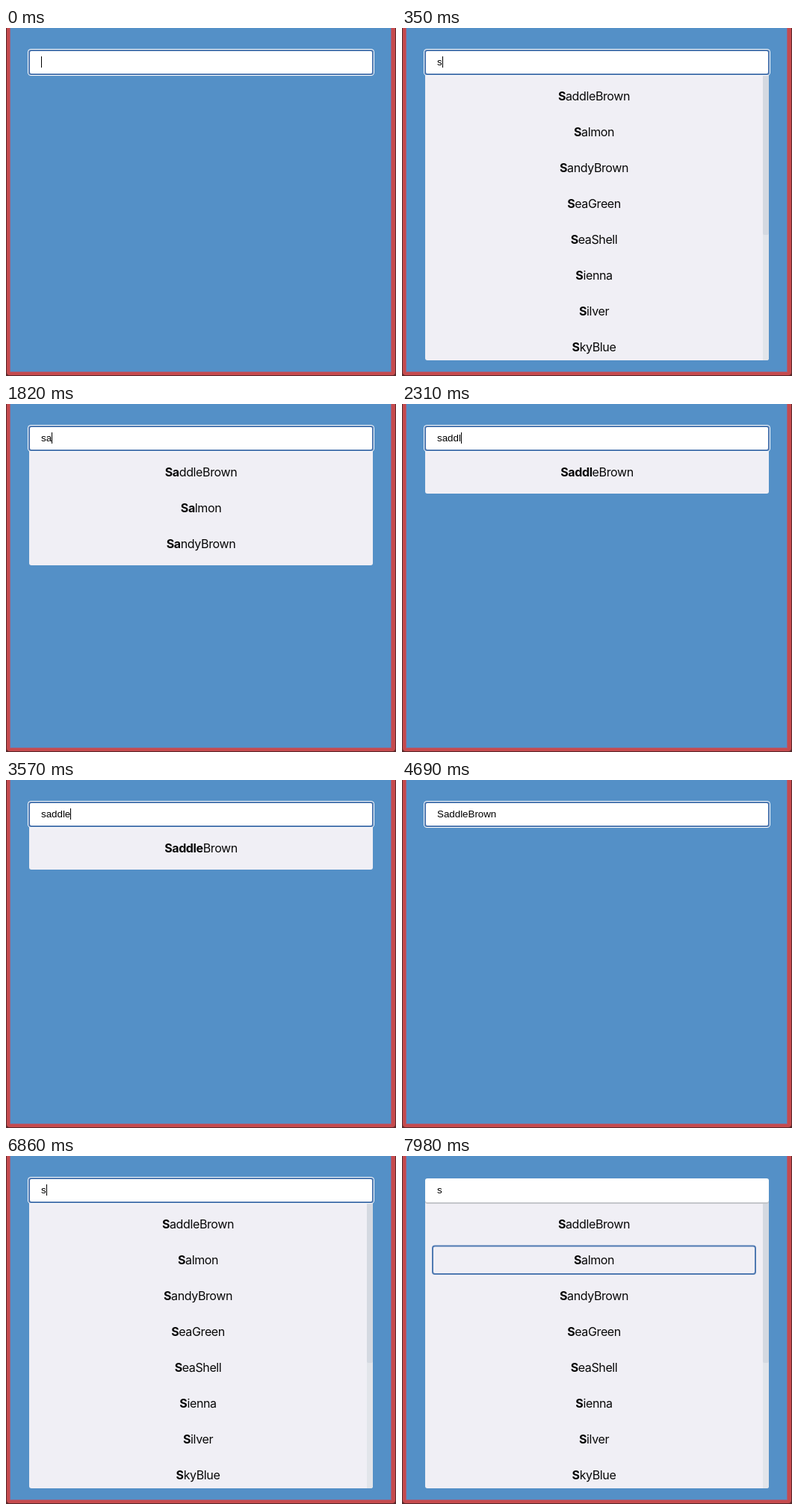
Write an HTML page that moves like this. It is 522 px wide and 466 px high and loops after 8 s.

```html
<!DOCTYPE html>
<html lang="en">
<head>
<meta charset="utf-8">
<title>Colour autocomplete</title>
<style>
  html, body { margin: 0; width: 100%; height: 100%; overflow: hidden; background: #5490c7; }
  svg { display: block; width: 522px; height: 466px; }
  .option { font: 16px Inter, sans-serif; letter-spacing: -0.38px; text-anchor: middle; fill: #080808; }
  .match { font-weight: 700; }
  .value { font: 13.333px "Liberation Sans", Arial, sans-serif; fill: #000; }
</style>
</head>
<body>
<svg viewBox="0 0 522 466">
  <!-- window frame -->
  <rect width="522" height="466" fill="#58292b"/>
  <rect x="1" y="-10" width="520" height="475" rx="4" fill="#c64b4e"/>
  <rect x="5" y="-10" width="511" height="471" fill="#a0607f"/>
  <rect x="6" y="-10" width="509" height="470" fill="#5490c7"/>

  <g id="list">
    <rect id="panel" x="31" y="50" width="460" rx="3" fill="#f0eff5"/>
    <g id="bar">
      <path d="M483 62H491V442Q491 445 488 445H483Z" fill="#e2e5ea"/>
      <path d="M483 62H491V275Q491 277 489 277H485Q483 277 483 275Z" fill="#d4d9e1"/>
    </g>
    <g id="options"></g>
    <rect id="focus" x="41" height="37.5" rx="3" fill="none" stroke="#4f79b1" stroke-width="2"/>
  </g>

  <g id="idle">
    <rect x="31" y="31" width="460" height="33" rx="3" fill="#c3c6ca"/>
    <rect x="31" y="30" width="460" height="32" rx="3" fill="#fff"/>
  </g>
  <g id="ring">
    <rect id="halo" x="29" y="28" width="464" height="36" rx="4.5" fill="#fff"/>
    <rect x="30" y="29" width="462" height="34" rx="3.5" fill="#4f79b1"/>
    <rect x="32" y="31" width="458" height="30" rx="2" fill="#fff"/>
  </g>
  <rect id="selection" x="47" y="38" height="15" fill="#b4d6fe"/>
  <text id="value" class="value" x="47" y="50"></text>
  <rect id="caret" y="38" width="1" height="15"/>
</svg>
<script>
const LOOP = 8000;
const ROW = 48;
const COLORS = ["SaddleBrown", "Salmon", "SandyBrown", "SeaGreen", "SeaShell", "Sienna", "Silver", "SkyBlue"];

// Each step changes only the named parts of the state.
const STEPS = [
  { at: 0, value: "", open: false, focused: true, caret: true, selected: false, active: -1 },
  { at: 350, value: "s", open: true },
  { at: 840, caret: false },
  { at: 1400, caret: true },
  { at: 1820, value: "sa" },
  { at: 1960, value: "sad" },
  { at: 2170, value: "sadd" },
  { at: 2310, value: "saddl" },
  { at: 2520, value: "saddle" },
  { at: 3010, caret: false },
  { at: 3570, caret: true },
  { at: 3780, focused: false, caret: false, active: 0 },
  { at: 4060, value: "SaddleBrown", open: false, active: -1 },
  { at: 4130, focused: true, caret: true },
  { at: 4690, caret: false },
  { at: 5180, caret: true },
  { at: 5530, selected: true, caret: false },
  { at: 5950, value: "", selected: false, caret: true },
  { at: 6440, caret: false },
  { at: 6860, value: "s", open: true, caret: true },
  { at: 7350, caret: false },
  { at: 7700, focused: false, active: 0 },
  { at: 7910, active: 1 }
];

const el = id => document.getElementById(id);
const show = (id, on) => el(id).setAttribute("display", on ? "inline" : "none");
const set = (id, attrs) => {
  for (const key in attrs) el(id).setAttribute(key, attrs[key]);
};

function stateAt(t) {
  return Object.assign({}, ...STEPS.filter(step => step.at <= t));
}

function drawList({ value, active }) {
  const names = COLORS.filter(name => name.toLowerCase().startsWith(value.toLowerCase()));
  const scrolls = names.length > 7;
  const right = scrolls ? 483 : 491;
  const bottom = Math.min(72 + ROW * names.length, 445);
  const size = value.length;
  el("options").innerHTML = names.map((name, i) =>
    `<text class="option" x="${(31 + right) / 2}" y="${97 + ROW * i}">` +
    `<tspan class="match">${name.slice(0, size)}</tspan>${name.slice(size)}</text>`
  ).join("");
  set("panel", { height: bottom - 50 });
  set("focus", { y: 72.5 + ROW * active, width: right - 51 });
  show("bar", scrolls);
  show("focus", active >= 0);
}

function draw(s) {
  show("list", s.open);
  show("bar", false);
  show("focus", false);
  if (s.open) drawList(s);
  show("idle", !s.focused);
  show("ring", s.focused);
  el("value").textContent = s.value;
  const width = s.value ? el("value").getComputedTextLength() : 0;
  set("selection", { width });
  show("selection", s.selected);
  set("caret", { x: Math.round(47 + width) });
  show("caret", s.caret);
}

let last = "";
function tick() {
  const state = stateAt(performance.now() % LOOP);
  const key = JSON.stringify(state);
  if (key !== last) draw(state);
  last = key;
  requestAnimationFrame(tick);
}
tick();
</script>
</body>
</html>
```
